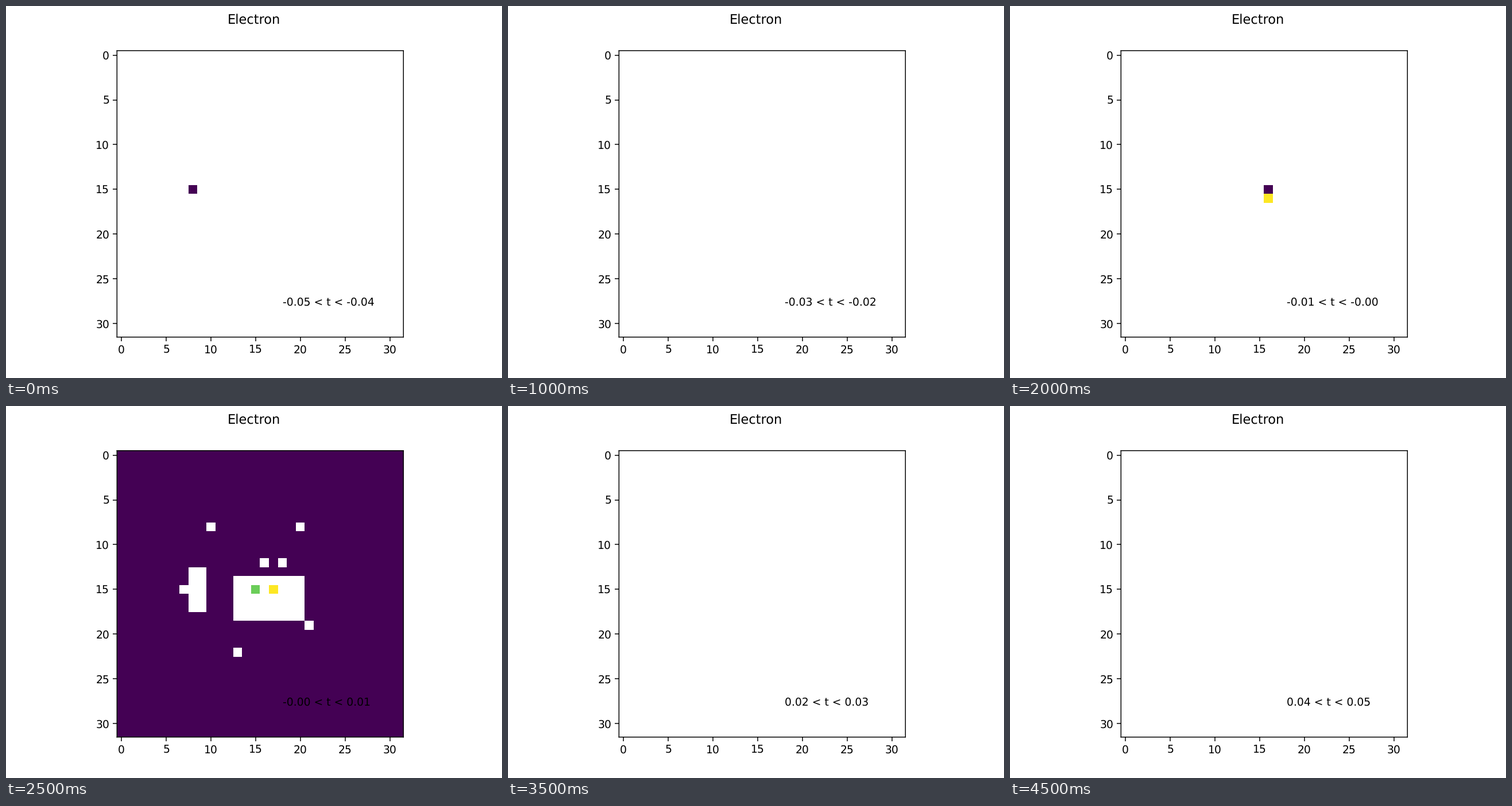
Recreate the animation shown at these times as a matplotlib script. Size 864 by 648 pixels, loop 5 s.

```python
import matplotlib.pyplot as plt
import numpy as np
from matplotlib.animation import FuncAnimation

SIZE = 32
STEPS = 10
BURST = 5

# single hits as (row, column), from the weakest to the strongest
HITS = {
    0: [(15, 8)],
    1: [(14, 15)],
    3: [(15, 8), (8, 10)],
    4: [(15, 16), (16, 16)],
    6: [(16, 17)],
}
# cells that stay empty in the burst: two blocks, two pairs, three strays
HOLES = [
    np.s_[13:18, 8:10], np.s_[14:19, 13:21],
    np.s_[8, 10:21:10], np.s_[12, 16:19:2],
    np.s_[15, 7], np.s_[19, 21], np.s_[22, 13],
]


def grid(step):
    data = np.full((SIZE, SIZE), np.nan)
    if step == BURST:
        data[:] = 0
        for hole in HOLES:
            data[hole] = np.nan
        data[15, 15:18:2] = 0.777, 1
    hits = HITS.get(step, [])
    for cell, level in zip(hits, np.linspace(0, 1, len(hits))):
        data[cell] = level
    return data


def edge(i):
    # keeps the sign of the middle edge: -0.00
    return (BURST - i) / -100


def draw(step):
    image.set_data(grid(step))
    label.set_text(f"{edge(step):.2f} < t < {edge(step + 1):.2f}")
    return image, label


# soft, unsnapped edges and letters
plt.rcParams.update({
    "font.family": "DejaVu Sans",
    "path.snap": False,
    "text.hinting": "none",
})
fig, ax = plt.subplots(figsize=(6.4, 4.8), dpi=135)
fig.suptitle("Electron")
image = ax.imshow(grid(0), cmap="viridis", vmin=0, vmax=1,
                  interpolation="nearest")
label = ax.text(18, 28, "", color="black")

anim = FuncAnimation(fig, draw, frames=STEPS, init_func=lambda: draw(0),
                     interval=500, repeat=True, repeat_delay=0)
plt.show()
```
